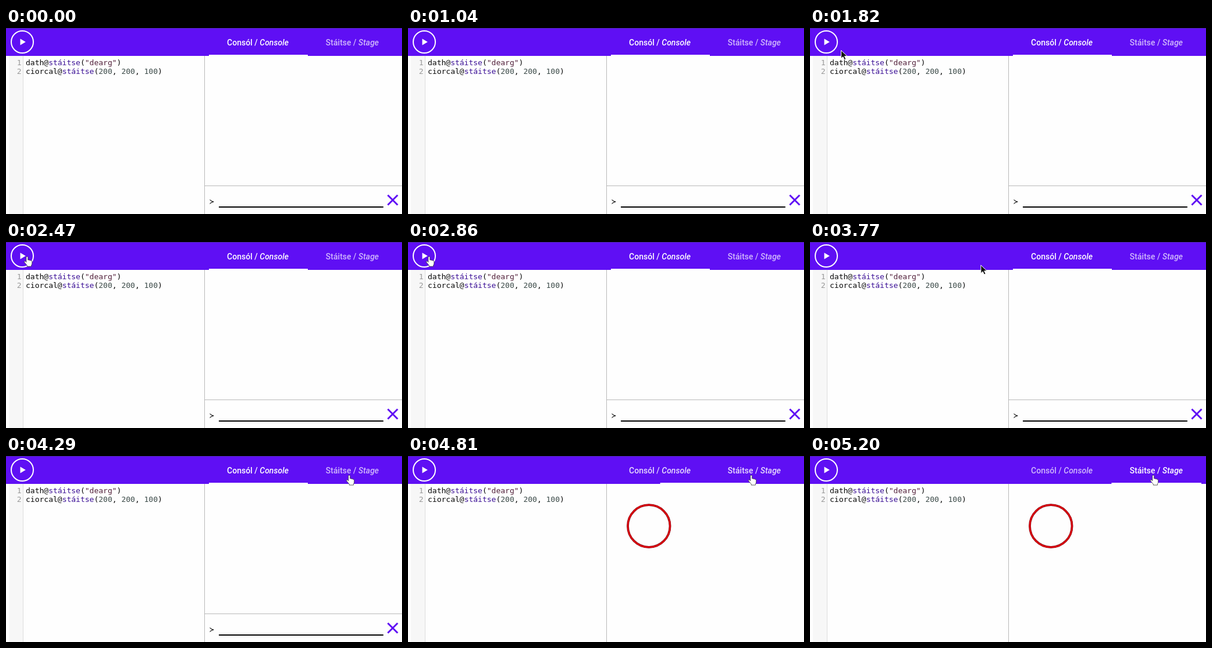
Write an HTML page that moves like this. It is 681 by 320 pixels and loops after 6.24 s.

```html
<!DOCTYPE html>
<html lang="ga">
<head>
<meta charset="utf-8">
<title>Consól / Stáitse</title>
<style>
  html, body { margin: 0; width: 100%; height: 100%; overflow: hidden; background: #fefefe; }
  svg { display: block; }
  text { white-space: pre; }
  .code { font: 13px "DejaVu Sans Mono", monospace; fill: #080808; }
  .number { fill: #999; text-anchor: end; }
  .property { fill: #3a0f96; }
  .string { fill: #52203a; }
  .digit { fill: #3b4a48; }
  .tab { font: 500 14px Roboto, sans-serif; fill: #fff; text-anchor: middle; }
  .tab tspan { font-style: italic; }
</style>
</head>
<body>
<svg width="681" height="320" viewBox="0 0 681 320">
  <rect width="681" height="320" fill="#fefefe"/>

  <!-- Editor -->
  <rect x="5" y="48" width="24" height="272" fill="#f7f7f7"/>
  <rect x="29" y="48" width="1" height="272" fill="#ddd"/>
  <g class="code">
    <text class="number" x="26.5" y="64">1</text>
    <text class="number" x="26.5" y="79">2</text>
    <text x="34" y="64">dath@<tspan class="property">stáitse</tspan>(<tspan class="string">"dearg"</tspan>)</text>
    <text x="34" y="79">ciorcal@<tspan class="property">stáitse</tspan>(<tspan class="digit">200</tspan>, <tspan class="digit">200</tspan>, <tspan class="digit">100</tspan>)</text>
  </g>
  <rect x="341" y="48" width="1" height="272" fill="#b8b8b8"/>

  <!-- Console pane -->
  <g id="console">
    <rect x="342" y="271" width="339" height="1" fill="#b8b8b8"/>
    <text class="code" x="350" y="303">≻</text>
    <rect x="366" y="307" width="283" height="2" fill="#000"/>
    <path d="M656.5 287.5l17 17m0-17l-17 17" stroke="#5f0ff4" stroke-width="3"/>
  </g>

  <!-- Stage pane -->
  <g id="stage" fill="none">
    <circle cx="414.3" cy="120.5" r="36.3" stroke="#7a1018" stroke-width="3.8"/>
    <circle cx="414.3" cy="120.5" r="36.3" stroke="#d9040f" stroke-width="2.8"/>
  </g>

  <!-- Header -->
  <rect width="681" height="48" fill="#5f0ff4"/>
  <rect width="681" height="1" fill="#4b28a4"/>
  <circle cx="28" cy="24" r="19" fill="none" stroke="#fff" stroke-width="2"/>
  <path d="M24.5 18.5v11l9.3-5.5z" fill="#fff"/>
  <text class="tab" id="consoleTab" x="433" y="30">Consól / <tspan>Console</tspan></text>
  <text class="tab" id="stageTab" x="595.5" y="30">Stáitse / <tspan>Stage</tspan></text>
  <rect id="indicator" y="46" height="2" fill="#fff"/>

  <!-- Pointer shapes, with the hot spot at the origin -->
  <g id="pointer" stroke-linejoin="round">
    <path id="arrow" d="M.5 .5V14.5l3.3-3 2.4 5.2 2.6-1.2-2.4-5h4.6z" fill="#111" stroke="#fff"/>
    <path id="hand" d="M-1.2 8V1.3Q-1.2 0 .2 0T1.8 1.3V6q1.2-.9 2.3.4 1.5-.7 2.4.7 2.2-.3 2.3 1.5v3.2q0 1.7-1.2 3.3V17H.3v-1.7L-4.3 10q-.8-1.3.4-2t2.7 1.7z" fill="#fff" stroke="#333" stroke-width=".8"/>
  </g>
</svg>
<script>
const LOOP = 6240, STEP = 130;
const SWITCH_START = 4680, SWITCH_TIME = 260;
const el = id => document.getElementById(id);
const show = (id, on) => el(id).setAttribute("visibility", on ? "visible" : "hidden");
const clamp = v => Math.min(1, Math.max(0, v));
const mix = (a, b, p) => a + (b - a) * p;

// Pointer path: time, x, y
const path = [
  [1430, 150, 130], [1820, 53, 38], [2080, 36, 25], [2990, 36, 25],
  [3380, 85, 35], [3640, 190, 40], [4030, 500, 38], [4290, 590, 33]
];

function pointerAt(t) {
  const i = path.findIndex(k => k[0] > t);
  if (i < 0) return path[path.length - 1].slice(1);
  const [t0, x0, y0] = path[Math.max(0, i - 1)], [t1, x1, y1] = path[i];
  const p = clamp((t - t0) / (t1 - t0 || 1));
  return [mix(x0, x1, p), mix(y0, y1, p)];
}

function draw(t) {
  const [x, y] = pointerAt(t);
  const visible = t >= path[0][0];
  const clickable = Math.hypot(x - 28, y - 24) < 20 || (x > 349 && y < 48);
  el("pointer").setAttribute("transform", `translate(${x} ${y})`);
  show("arrow", visible && !clickable);
  show("hand", visible && clickable);

  const p = clamp((t - SWITCH_START) / SWITCH_TIME);
  const slide = p * p * (3 - 2 * p);
  el("indicator").setAttribute("x", mix(349, 518.5, slide));
  el("indicator").setAttribute("width", mix(170, 154.5, slide));
  el("consoleTab").setAttribute("opacity", mix(1, .7, slide));
  el("stageTab").setAttribute("opacity", mix(.7, 1, slide));
  show("console", p < .5);
  show("stage", p >= .5);
}

const start = performance.now();
function tick() {
  const t = (performance.now() - start) % LOOP;
  draw(Math.floor(t / STEP) * STEP);
  requestAnimationFrame(tick);
}
tick();
</script>
</body>
</html>
```
